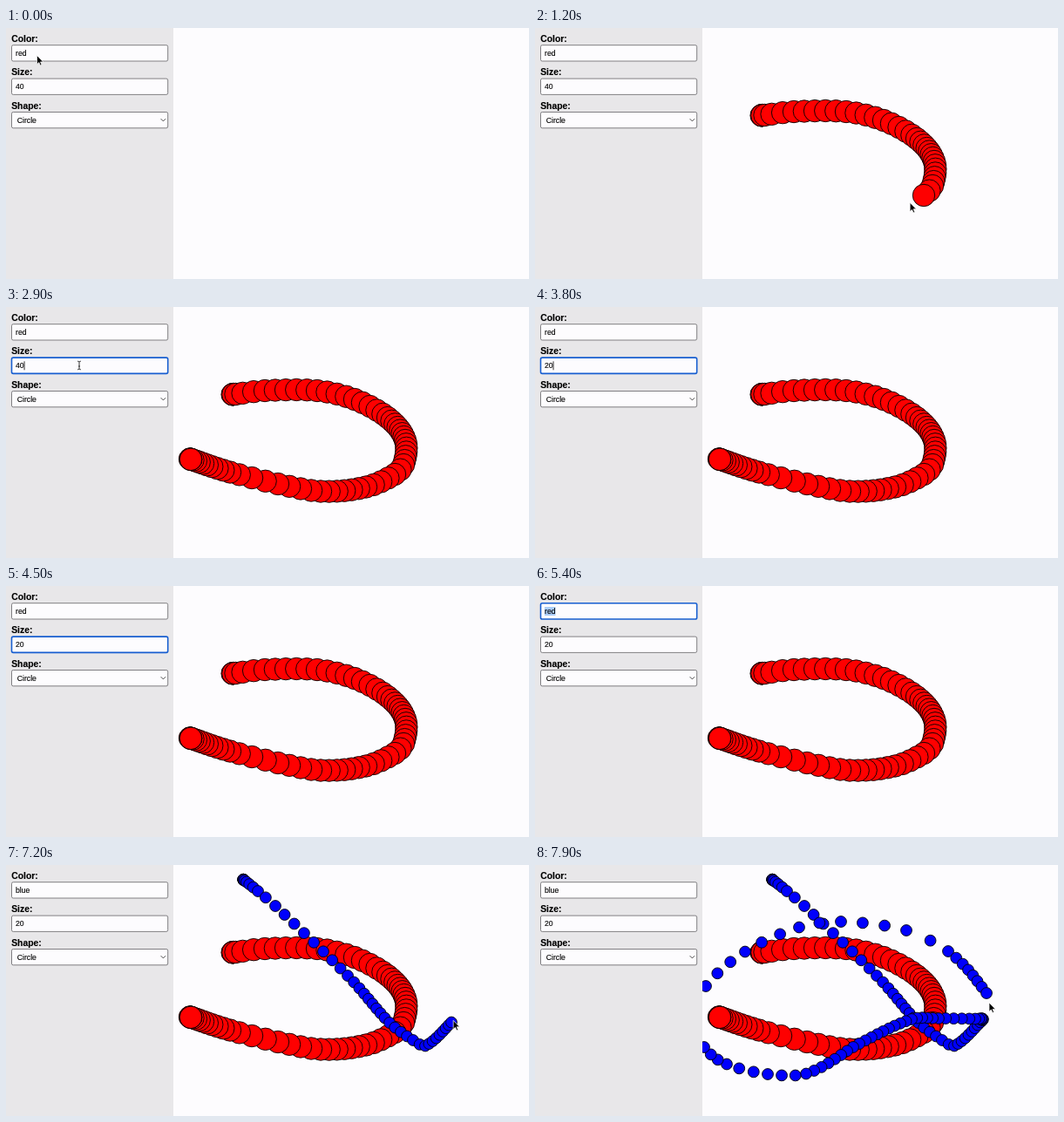
An HTML page that plays this animation: 600 by 288 pixels, repeating every 8000 ms.

```html
<!DOCTYPE html>
<html lang="en">
<head>
<meta charset="utf-8">
<title>Drawing panel</title>
<style>
  html, body { margin: 0; height: 100%; overflow: hidden; background: #fdfcfe; }
  svg { display: block; width: 100vw; height: 100vh; }
  text { font: 8.67px Arial, "Liberation Sans", sans-serif; white-space: pre; stroke: #000; stroke-width: .12; }
  .label { font-size: 10.4px; font-weight: bold; }
  .field { fill: #fdfcfe; stroke: #747376; stroke-width: .9; }
  .field.focused { stroke: #185fd0; stroke-width: 1.6; }
  .selection { fill: #abcdf8; }
  .dots circle { stroke: #000; stroke-width: .9; }
</style>
</head>
<body>
<svg viewBox="0 0 600 288">
  <clipPath id="board"><rect x="192" width="408" height="288"/></clipPath>
  <g clip-path="url(#board)"><g class="dots" id="dots"></g></g>
  <rect width="192" height="288" fill="#e8e7e9"/>
  <g id="panel"></g>
  <path d="M177.7 104.2l2.7 2.7 2.7-2.7" fill="none" stroke="#333" stroke-width=".9"/>
  <path id="arrow" d="M0 0V10.2L2.3 8 3.9 11.5 5.5 10.8 4 7.4H7.2Z" stroke="#fff" stroke-width=".7"/>
  <path id="beam" d="M-1.9-4.8Q0-4.8 0-3.6Q0-4.8 1.9-4.8M0-3.6V3.6M-1.9 4.8Q0 4.8 0 3.6Q0 4.8 1.9 4.8M-1 1H1"
        fill="none" stroke="#222" stroke-width=".9"/>
</svg>
<script>
const LOOP = 8000, FRAME = 100;
const DOTS_PER_MS = 0.095;
const $ = id => document.getElementById(id);
const clamp = (v, low, high) => Math.min(Math.max(v, low), high);

function add(parent, tag, attributes) {
  const node = document.createElementNS('http://www.w3.org/2000/svg', tag);
  for (const name in attributes) node.setAttribute(name, attributes[name]);
  return parent.appendChild(node);
}
const show = (node, visible) => node.setAttribute('visibility', visible ? 'visible' : 'hidden');

// Smooth hand movement through keys [x, y, steps since the previous key].
function trail(keys) {
  const velocity = (i, axis) => {
    const before = keys[Math.max(i - 1, 0)], after = keys[Math.min(i + 1, keys.length - 1)];
    const steps = (i > 0 ? keys[i][2] : 0) + (after === keys[i] ? 0 : after[2]);
    return (after[axis] - before[axis]) / steps;
  };
  const hermite = (i, axis, k) => {
    const a = keys[i - 1][axis], b = keys[i][axis], steps = keys[i][2];
    const ease = k * k * (3 - 2 * k);
    return a + (b - a) * ease
      + steps * k * (1 - k) * ((1 - k) * velocity(i - 1, axis) - k * velocity(i, axis));
  };
  const points = [keys[0].slice(0, 2)];
  for (let i = 1; i < keys.length; i++)
    for (let step = 1; step <= keys[i][2]; step++)
      points.push([0, 1].map(axis => hermite(i, axis, step / keys[i][2])));
  return points;
}

function stroke(color, radius, begin, keys) {
  const points = trail(keys);
  const dots = points.map(([cx, cy]) => add($('dots'), 'circle', { cx, cy, r: radius, fill: color }));
  const count = t => Math.floor((t - begin) * DOTS_PER_MS + .001);
  return {
    first: points[0],
    last: points.at(-1),
    draw: t => dots.forEach((dot, i) => show(dot, i < count(t))),
    ahead: (t, lead) => points[clamp(count(t) - 1 + lead, 0, points.length - 1)]
  };
}

const red = stroke('#fe0000', 12.7, 800, [
  [261, 100, 0], [263.5, 100, 5], [297, 96, 3], [357, 96, 5], [400, 106, 4], [438, 127, 5],
  [458, 153, 7], [456, 181, 6], [446, 192, 2], [413, 206.5, 4], [361, 211.5, 6],
  [312, 203, 4], [257, 189.5, 4], [214.5, 175.5, 8], [212, 174.8, 6]
]);
const blue = stroke('#0000fc', 6.4, 6700, [
  [273, 17.5, 0], [274, 18, 9], [289, 30, 4], [309, 47, 2], [392, 127, 8], [440, 181, 9],
  [467, 201, 4], [481, 207.5, 2], [511, 180.5, 8], [513.5, 176.5, 3], [505, 176.5, 4],
  [463, 176, 5], [432, 177, 5], [372, 205, 9], [311, 239.5, 8], [267, 240, 3], [220, 228.5, 3],
  [194, 209, 3], [178, 178, 2], [196, 139, 2], [241, 99.5, 3], [303, 71.5, 3], [351, 65, 2],
  [426, 75, 3], [474, 99, 2], [518, 147, 7], [521, 158, 1]
]);

function field(label, row) {
  const panel = $('panel'), top = 19.7 + 38.4 * row;
  add(panel, 'text', { x: 6.2, y: top - 3.7, class: 'label' }).textContent = label;
  const box = add(panel, 'rect', { x: 6.5, y: top, width: 179.2, height: 18.3, rx: 1.8 });
  const selection = add(panel, 'rect', { x: 11, y: top + 4.3, height: 10, class: 'selection' });
  const text = add(panel, 'text', { x: 11, y: top + 12.3 });
  const caret = add(panel, 'rect', { y: top + 4.2, width: .8, height: 10 });
  return { text, draw(value, focused = false, selected = false, blink = false) {
    text.textContent = value;
    const width = text.getComputedTextLength();
    box.setAttribute('class', focused ? 'field focused' : 'field');
    selection.setAttribute('width', width);
    caret.setAttribute('x', 11 + width);
    show(selection, selected);
    show(caret, focused && !selected && blink);
  } };
}
const color = field('Color:', 0), size = field('Size:', 1), shape = field('Shape:', 2);
shape.text.setAttribute('x', 12.8);

function glide(t, begin, end, from, to) {
  const k = clamp((t - begin) / (end - begin), 0, 1), ease = k * k * (3 - 2 * k);
  return from.map((v, i) => v + (to[i] - v) * ease);
}

const inColor = [35.5, 31.5], inSize = [84, 67];
function pointerAt(t) {
  if (t < 900) return glide(t, 200, 500, inColor, red.first);
  if (t < 1600) return red.ahead(t, 2);
  if (t < 6200) return glide(t, 1600, 2000, red.last, inSize);
  return t < 6800 ? glide(t, 6200, 6600, inSize, blue.first) : blue.ahead(t, 1);
}

function render(time) {
  const t = Math.floor(time % LOOP / FRAME) * FRAME;
  red.draw(t);
  blue.draw(t);

  const sizeFocus = t >= 2700 && t < 4600, colorFocus = t >= 4600 && t < 6800;
  const sizeValue = t < 3400 ? '40' : t < 3600 ? '2' : '20';
  const colorValue = t < 5700 ? 'red' : 'blue'.slice(0, (t - 5600) / 100);
  const blink = (t + 400) % 1000 < 500;
  color.draw(colorValue, colorFocus, colorFocus && t < 5700, blink);
  size.draw(sizeValue, sizeFocus, t >= 3000 && t < 3400, blink);
  shape.draw('Circle');

  // The pointer hides while typing and turns into a beam over a text field.
  const [x, y] = pointerAt(t);
  const visible = t < 3400 || t >= 6200;
  const overField = t > 1600 && x < 186 && (y > 19 && y < 39 || y > 58 && y < 77);
  for (const [id, on] of [['arrow', !overField], ['beam', overField]]) {
    $(id).setAttribute('transform', `translate(${x} ${y})`);
    show($(id), visible && on);
  }
}

const start = performance.now();
function tick() {
  render(performance.now() - start);
  requestAnimationFrame(tick);
}
tick();
</script>
</body>
</html>
```
